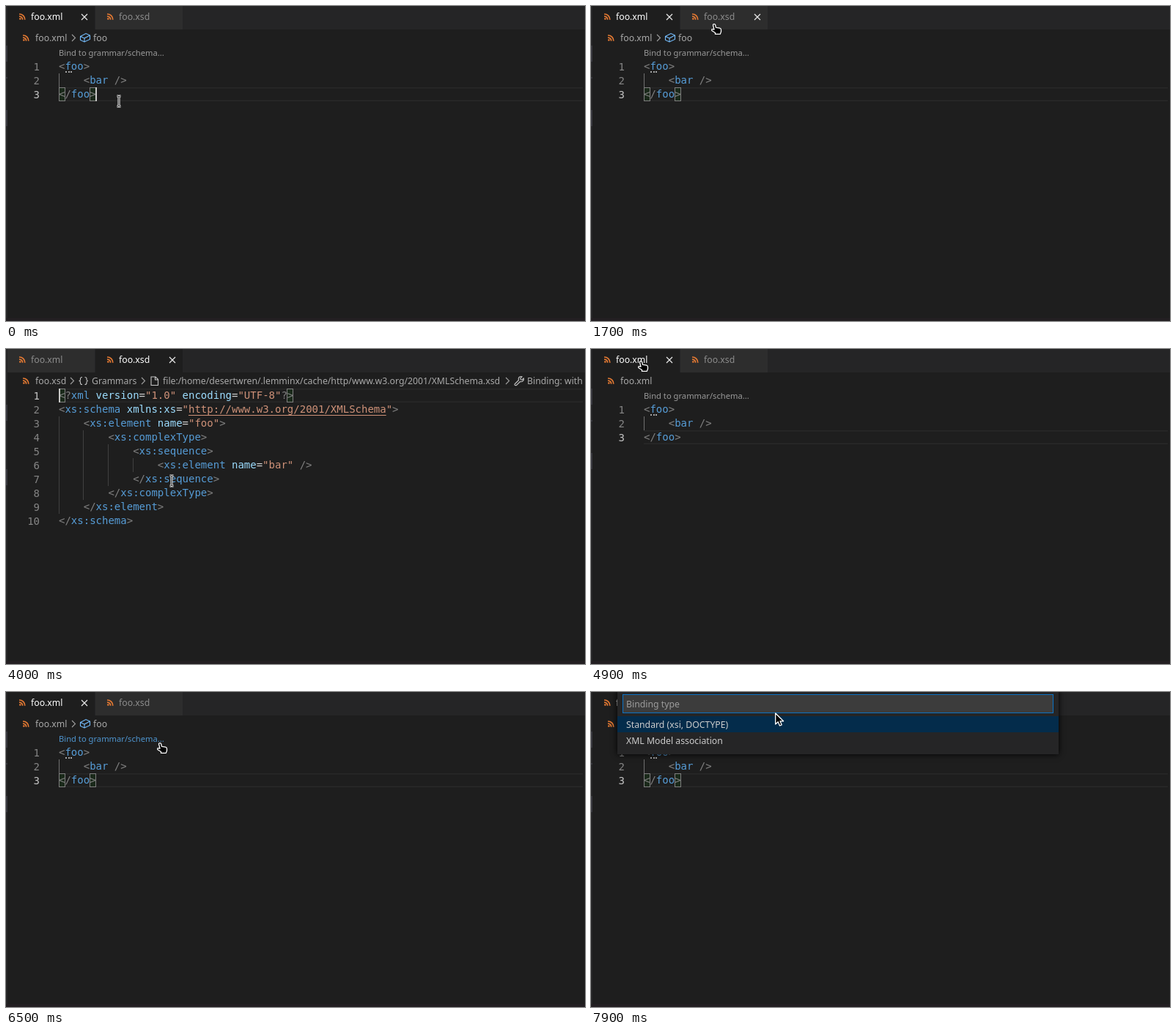
An HTML page with a canvas for the animation above (8000 ms loop, 790 px wide and 430 px high).

```html
<!DOCTYPE html>
<html lang="en">
<meta charset="utf-8">
<title>XML editor</title>
<style>
html, body { margin: 0; width: 100%; height: 100%; overflow: hidden; background: #1e1e1e }
canvas { display: block }
</style>
<canvas width="790" height="430"></canvas>
<script>
const c = document.querySelector('canvas').getContext('2d');
const LOOP = 8000, CW = 8.428, LH = 19, LEFT = 72;
const UI = '12.28px "Noto Sans", sans-serif';
const LENS = '11.2px "Noto Sans", sans-serif';
const MONO = '14px "DejaVu Sans Mono", monospace';

const XML = ['<foo>', '    <bar />', '</foo>'];
const XSD = [
  '<?xml version="1.0" encoding="UTF-8"?>',
  '<xs:schema xmlns:xs="http://www.w3.org/2001/XMLSchema">',
  '    <xs:element name="foo">',
  '        <xs:complexType>',
  '            <xs:sequence>',
  '                <xs:element name="bar" />',
  '            </xs:sequence>',
  '        </xs:complexType>',
  '    </xs:element>',
  '</xs:schema>'
];

// pointer way points: time, x, y
const PATH = [
  [0, 154, 130], [400, 92, 84], [500, 80, 47], [600, 60, 40], [700, 46, 28], [900, 57, 16],
  [1000, 80, 22], [1500, 172, 20], [1700, 168, 24], [2100, 168, 24], [2200, 157, 41],
  [2300, 170, 110], [2400, 193, 170], [2500, 193, 170], [2600, 200, 180], [2800, 240, 254],
  [3600, 240, 254], [4000, 226, 180], [4300, 110, 48], [4500, 73, 16], [4600, 68, 16],
  [5100, 68, 16], [5400, 76, 40], [5600, 110, 50], [5900, 205, 66], [6000, 210, 69],
  [7500, 210, 69], [7900, 251, 28]
];

// the screen is refreshed every 100 ms
function pointerAt(t) {
  const i = PATH.findIndex(p => p[0] > t);
  if (i < 0) return PATH[PATH.length - 1].slice(1);
  const [a, b] = [PATH[i - 1], PATH[i]], k = (t - a[0]) / (b[0] - a[0]);
  return [1, 2].map(j => Math.round(a[j] + (b[j] - a[j]) * k));
}

function rect(x, y, w, h, color) {
  c.fillStyle = color;
  c.fillRect(x, y, w, h);
}

function frame(x, y, w, h, color) {
  c.strokeStyle = color;
  c.lineWidth = 1;
  c.strokeRect(x + .5, y + .5, w - 1, h - 1);
}

function text(s, x, y, color, font = UI) {
  c.font = font;
  c.fillStyle = color;
  c.fillText(s, x, y);
}

function shape(d, x, y, stroke, width = 1, fill) {
  const p = new Path2D(d);
  c.save();
  c.translate(x, y);
  if (fill) { c.fillStyle = fill; c.fill(p); }
  if (stroke) { c.strokeStyle = stroke; c.lineWidth = width; c.stroke(p); }
  c.restore();
}

function feed(x, y) {
  shape('M0 4.2A4.3 4.3 0 0 1 4.6 8.8M0 1A7.6 7.6 0 0 1 7.8 8.8', x, y, '#e37933', 1.7);
  c.beginPath();
  c.arc(x + 1.3, y + 7.5, 1.3, 0, 7);
  c.fillStyle = '#e37933';
  c.fill();
}

const chevron = x => shape('M0 0L4.5 4.5L0 9', x, 39, '#a0a0a0', 1.1);
const cross = x => shape('M0 0L8 8M8 0L0 8', x, 11, '#e8e8e8', 1.2);

function tab(name, x, active, hover) {
  rect(x, 0, 119, 32, active ? '#1e1e1e' : '#2d2d2d');
  feed(x + 16, 10);
  text(name, x + 32, 19, active ? '#fff' : '#8c8c8c');
  if (active || hover) cross(x + 101);
}

function crumbs(xsd, ready, over) {
  const tone = (a, b) => over(a, 33, b, 54) ? '#e0e0e0' : '#a9a9a9';
  const label = (s, x, a, b) => text(s, x, 48, tone(a, b));
  feed(23, 39);
  label(xsd ? 'foo.xsd' : 'foo.xml', 40, 23, 85);
  if (!ready) return;
  if (!xsd) {
    chevron(90);
    shape('M1 4.5L8.5 .5L14 3V8.5L6.5 12L1 9.5ZM1 4.5L6.5 7V12M6.5 7L14 3', 100.5, 37, '#75beff', 1.1);
    label('foo', 119, 100, 139);
    return;
  }
  chevron(88);
  shape('M5 .5Q2.5 .5 2.5 2.5V4Q2.5 5.5 .5 5.5Q2.5 5.5 2.5 7V8.5Q2.5 10.5 5 10.5' +
    'M8.5 .5Q11 .5 11 2.5V4Q11 5.5 13 5.5Q11 5.5 11 7V8.5Q11 10.5 8.5 10.5', 99, 38, '#c5c5c5', 1.1);
  label('Grammars', 117, 98, 180);
  chevron(185);
  shape('M1 .5H7L10.5 4V12H1ZM6.5 .5V4.5H10.5', 197, 37.5, '#c5c5c5', 1.1);
  label('file:/home/desertwren/.lemminx/cache/http/www.w3.org/2001/XMLSchema.xsd', 214, 196, 677);
  chevron(682);
  shape('M1.5 10.5L6.5 5.5Q5.5 2 8.5 .8Q10 .3 11 .8L8.8 3L9.2 4.8L11 5.2L13.2 3' +
    'Q14 6 11.5 7.3Q10 8 8.5 7.5L3.5 12.5Q1.8 13 1 12Q.7 11.2 1.5 10.5Z', 693, 37, '#c5c5c5', 1.1);
  label('Binding: with', 711, 692, 790);
}

function codeLine(s, y) {
  const put = (part, at, color) => part && text(part, LEFT + at * CW, y, color, MONO);
  const token = /(<[?\/]?)([\w:]*)|([\/?]?>)|("[^"]*")|(=)|([\w:]+)/g;
  for (const m of s.matchAll(token)) {
    const [, open, tag, close, str, eq, attr] = m;
    put(open, m.index, '#808080');
    put(tag, m.index + (open || '').length, '#569cd6');
    put(close, m.index, '#808080');
    put(str, m.index, '#ce9178');
    put(eq, m.index, '#d4d4d4');
    put(attr, m.index, '#9cdcfe');
  }
}

function editor(xsd, ready, caret, over) {
  const lines = xsd ? XSD : XML, top = xsd ? 54 : 73;
  const now = xsd ? 0 : 2, y0 = top + now * LH;
  rect(LEFT, y0, 715, 1.5, '#282828');
  rect(LEFT, y0 + 17.5, 715, 1.5, '#282828');
  if (ready) for (const col of [0, lines[now].length - 1]) {
    const x = Math.floor(LEFT + col * CW);
    rect(x, y0, 9, LH, 'rgba(0,100,0,.15)');
    frame(x, y0, 9, LH, '#7e7e7e');
  }
  lines.forEach((s, i) => {
    const y = top + i * LH, indent = s.search(/\S/), n = String(i + 1);
    for (let k = 0; k < indent; k += 4)
      rect(Math.floor(LEFT + k * CW), y, 1, LH, xsd ? '#404040' : '#707070');
    text(n, 46 - n.length * CW, y + 15, i == now ? '#c6c6c6' : '#858585', MONO);
    codeLine(s, y + 14);
  });
  if (xsd) rect(LEFT + 21 * CW, 90, 32 * CW, 1, '#ce9178');
  else {
    text('Bind to grammar/schema...', LEFT, 68, over(72, 54, 217, 73) ? '#4e94ce' : '#999', LENS);
    for (const x of [81, 85, 88]) rect(x, 89, 2, 2, '#a6a6a6');
  }
  if (caret) rect(xsd ? 72 : 122, y0, 2, LH, '#c8c8c6');
}

function menu(caret) {
  c.save();
  c.shadowColor = '#000';
  c.shadowBlur = 8;
  rect(36, -4, 602, 89, '#252526');
  c.restore();
  rect(43, 3, 588, 26, '#3c3c3c');
  frame(43, 3, 588, 26, '#0b72c4');
  text('Binding type', 48, 21, '#9c9c9c');
  if (caret) rect(48, 8, 1, 16, '#ccc');
  rect(36, 33, 602, 22, '#042c4b');
  text('Standard (xsi, DOCTYPE)', 48, 49, '#ccc');
  text('XML Model association', 48, 71, '#ccc');
}

function pointer(kind, x, y) {
  c.lineJoin = 'round';
  if (kind == 'beam') {
    const d = 'M-2.5 -7H-.8L0 -6.2L.8 -7H2.5M0 -6.2V6.2M-2.5 7H-.8L0 6.2L.8 7H2.5';
    shape(d, x, y, '#fff', 3);
    shape(d, x, y, '#000', 1);
  } else if (kind == 'hand') {
    shape('M2.5 2Q2.5 .7 4 .7Q5.4 .7 5.7 2L6.5 5.4L11.5 6.2Q13.5 6.6 13.5 8.5V11' +
      'L12.3 14.4H5.5V12.5L1.4 10Q.2 9 .8 8Q1.6 7.2 4 8.2Z', x - 4, y, '#fff', 1.3, '#000');
  } else {
    shape('M.7 1V16L4.2 12.8L6.5 18L9.2 16.8L7 11.8H11.6Z', x, y, '#fff', 1.3, '#000');
  }
  c.lineJoin = 'miter';
}

function draw(t) {
  const [x, y] = pointerAt(t);
  const xsd = t >= 1900 && t < 4900;
  const ready = t < 1900 || t >= 2000 && t < 4900 || t >= 5000;
  const open = t >= 6900;
  const blink = t % 1000 < 500 && t != 2400;
  const over = (a, b, e, f) => !open && x >= a && x < e && y >= b && y < f;

  rect(0, 0, 790, 430, '#1e1e1e');
  rect(0, 0, 790, 32, '#252526');
  tab('foo.xml', 2, !xsd, over(2, 0, 121, 32));
  tab('foo.xsd', 122, xsd, over(122, 0, 241, 32));
  crumbs(xsd, ready, over);
  editor(xsd, ready, ready && blink && !open, over);

  rect(0, 0, 2, 430, '#252526');
  for (const [top, h] of xsd ? [[76, 22], [164, 22]] : [[54, 22], [97, 2], [142, 22]])
    rect(0, top, 2, h, '#37373d');
  rect(0, 426, 790, 4, '#231f22');
  if (open) menu(t < 7500);

  const link = y < 32 || over(23, 33, 85, 54) || (xsd ? over(98, 33, 180, 54) : over(100, 33, 139, 54) || over(72, 54, 217, 73));
  const kind = open ? (t < 7600 ? 'hand' : 'arrow') : link ? 'hand' : y >= 54 && x > 62 ? 'beam' : 'arrow';
  pointer(kind, x, y);
}

function tick(now) {
  draw(Math.floor(now % LOOP / 100) * 100);
  requestAnimationFrame(tick);
}
requestAnimationFrame(tick);
</script>
</html>
```
